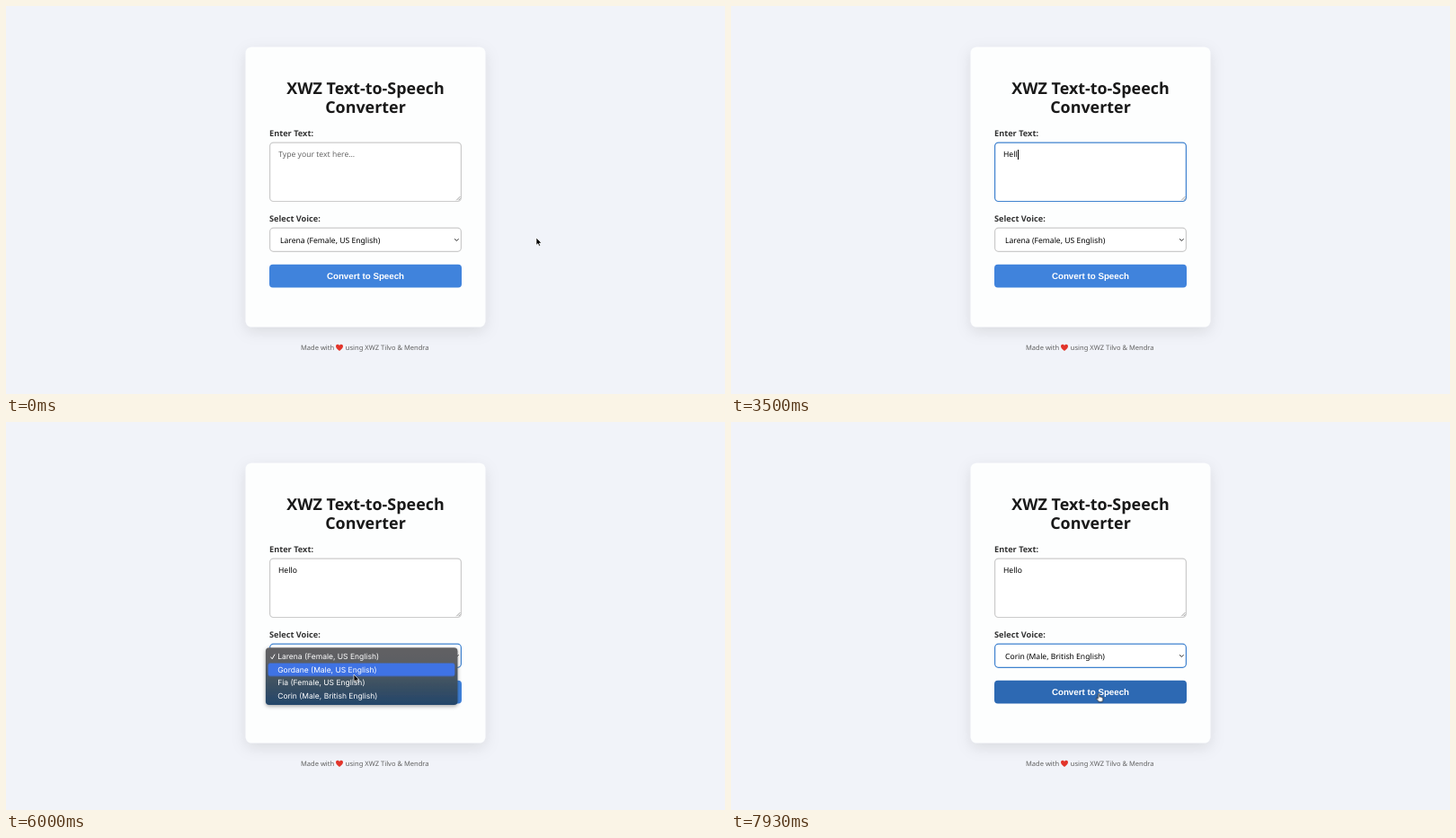
An HTML page for the animation above (8 s loop, 800 px wide and 432 px high).

```html
<!DOCTYPE html>
<html lang="en">
<head>
<meta charset="utf-8">
<title>Text-to-Speech Converter</title>
<style>
  html, body { margin: 0; width: 100%; height: 100%; overflow: hidden; background: #f1f3f9; }
  svg { position: absolute; left: 0; top: 0; display: block; }
  text, .typed { font-family: "Noto Sans", "Open Sans", sans-serif; font-size: 8.6px; text-rendering: geometricPrecision; }
  .title { font-size: 17.9px; font-weight: 800; fill: #191919; text-anchor: middle; }
  .label { font-size: 9.2px; font-weight: 700; fill: #333; }
  .value { font-size: 8.6px; font-weight: 500; }
  .footer { font-size: 7.55px; fill: #606060; }
  .action { font: 700 9.75px "Liberation Sans", Arial, sans-serif; fill: #fff; text-anchor: middle; }
  .menu text { font: 8.5px Inter, Roboto, sans-serif; fill: #fff; }
  .field { fill: #fff; stroke: #cbcbcb; stroke-width: 1.2; }

  .anim, .typed { animation: 8s linear infinite; }
  .step, .typed { animation-timing-function: step-end; }

  /* Typed text: the right border is the caret */
  .typed {
    position: absolute; left: 303px; top: 159.6px; height: 11px; line-height: 11px;
    white-space: pre; overflow: hidden; color: #000; font-weight: 500;
    border-right: .8px solid transparent; animation-name: type, caret;
  }
  @keyframes type {
    0% { width: 0; }
    26.6% { width: .75em; }
    35% { width: 1.32em; }
    38.5% { width: 1.59em; }
    41% { width: 1.86em; }
    45%, 100% { width: 2.5em; }
  }
  @keyframes caret {
    0% { border-color: transparent; }
    12.6% { border-color: #000; }
    19% { border-color: transparent; }
    24.5% { border-color: #000; }
    32% { border-color: transparent; }
    35% { border-color: #000; }
    51%, 100% { border-color: transparent; }
  }

  .placeholder { animation-name: placeholder; fill: #686868; }
  @keyframes placeholder { 0% { opacity: 1; } 26.6%, 100% { opacity: 0; } }

  .area { animation-name: area-focus; }
  @keyframes area-focus {
    0%, 12.5% { stroke: #cbcbcb; }
    15%, 61% { stroke: #3f82cf; }
    63%, 100% { stroke: #cbcbcb; }
  }
  .select { animation-name: select-focus; }
  @keyframes select-focus { 0%, 61% { stroke: #cbcbcb; } 63%, 100% { stroke: #3f82cf; } }

  .voice-before { animation-name: voice-before; }
  .voice-after { animation-name: voice-after; }
  @keyframes voice-before { 0% { opacity: 1; } 90.6%, 100% { opacity: 0; } }
  @keyframes voice-after { 0% { opacity: 0; } 90.6%, 100% { opacity: 1; } }

  .button { fill: #4083dc; animation-name: button-hover; }
  @keyframes button-hover { 0%, 93.4% { fill: #4083dc; } 96.3%, 100% { fill: #2d69b3; } }

  .menu { animation-name: menu; }
  @keyframes menu {
    0%, 60.99% { opacity: 0; }
    61%, 90.6% { opacity: 1; }
    93%, 100% { opacity: 0; }
  }
  .highlight { animation-name: highlight; }
  @keyframes highlight {
    0% { transform: none; fill: #4a78e4; }
    65.3% { transform: translateY(14.5px); fill: #3f73e5; }
    76.1% { transform: translateY(29px); fill: #316be0; }
    81.8%, 100% { transform: translateY(43.5px); fill: #2863db; }
  }

  .pointer { animation-name: path; }
  @keyframes path {
    0%, 1.5% { transform: translate(590px, 258px); }
    4% { transform: translate(568px, 291px); }
    6% { transform: translate(520px, 284px); }
    8% { transform: translate(458px, 228px); }
    9.5% { transform: translate(415px, 183px); }
    10.9%, 54.6% { transform: translate(399.5px, 169.5px); }
    56% { transform: translate(398px, 200px); }
    58.5%, 62% { transform: translate(395.5px, 255.5px); }
    65.5% { transform: translate(388px, 270px); }
    67.1% { transform: translate(387px, 277px); }
    75% { transform: translate(387px, 281px); }
    79% { transform: translate(387px, 290px); }
    83% { transform: translate(387px, 300px); }
    85.1%, 93% { transform: translate(387px, 303px); }
    95.2% { transform: translate(391px, 304px); }
    98%, 100% { transform: translate(409.5px, 303.8px); }
  }
  .arrow { animation-name: arrow; }
  .beam { animation-name: beam; }
  .hand { animation-name: hand; }
  @keyframes arrow { 0% { opacity: 1; } 8.4% { opacity: 0; } 56.7% { opacity: 1; } 93%, 100% { opacity: 0; } }
  @keyframes beam { 0% { opacity: 0; } 8.4% { opacity: 1; } 26.6% { opacity: 0; } 54.6% { opacity: 1; } 56.7%, 100% { opacity: 0; } }
  @keyframes hand { 0% { opacity: 0; } 93%, 100% { opacity: 1; } }
</style>
</head>
<body>
<svg width="800" height="432" viewBox="0 0 800 432">
  <defs>
    <filter id="card-shadow" x="-20%" y="-20%" width="140%" height="140%">
      <feDropShadow dx="0" dy="5" stdDeviation="8" flood-color="#000" flood-opacity=".1"/>
    </filter>
    <filter id="menu-shadow" x="-10%" y="-30%" width="120%" height="160%">
      <feDropShadow dx="0" dy="1.5" stdDeviation="2.2" flood-color="#000" flood-opacity=".35"/>
    </filter>
    <linearGradient id="menu-fill" x2="0" y2="1">
      <stop stop-color="#626164"/>
      <stop offset=".25" stop-color="#5c5e63"/>
      <stop offset=".65" stop-color="#3b5062"/>
      <stop offset="1" stop-color="#24466a"/>
    </linearGradient>
  </defs>

  <rect width="800" height="432" fill="#f1f3f9"/>
  <rect x="266.7" y="45.7" width="266.6" height="311.6" rx="6.5" fill="#fdfefe" filter="url(#card-shadow)"/>

  <text class="title" x="400" y="97.8">XWZ Text-to-Speech</text>
  <text class="title" x="400" y="119.4">Converter</text>

  <text class="label" x="293" y="145.2">Enter Text:</text>
  <rect class="field area anim" x="293.6" y="152.1" width="212.8" height="65.4" rx="4"/>
  <path d="M501.2 216.3l4.2-4.2M503.5 216.3l2-2" stroke="#777" stroke-width=".7"/>
  <text class="placeholder anim step" x="303.2" y="168.1">Type your text here...</text>

  <text class="label" x="293" y="240.2">Select Voice:</text>
  <rect class="field select anim" x="293.6" y="247.2" width="212.8" height="26.1" rx="4"/>
  <text class="value voice-before anim step" x="305" y="263.8">Larena (Female, US English)</text>
  <text class="value voice-after anim step" x="305" y="263.8">Corin (Male, British English)</text>
  <path d="M499.2 259.2l2.2 2.3 2.2-2.3" fill="none" stroke="#222" stroke-width=".95"/>

  <rect class="button anim" x="293" y="287.8" width="214" height="25.6" rx="4"/>
  <text class="action" x="400" y="304">Convert to Speech</text>

  <text class="footer" x="328" y="382.9">Made with</text>
  <path d="M371 384C368.2 381.8 367 380.4 367 378.7C367 376.3 370 376 371 378C372 376 375 376.3 375 378.7C375 380.4 373.8 381.8 371 384Z" fill="#e2352b"/>
  <text class="footer" x="377.8" y="382.9">using XWZ Tilvo &amp; Mendra</text>

  <g class="menu anim">
    <rect x="288.9" y="251.2" width="213.6" height="63.8" rx="4" fill="url(#menu-fill)" filter="url(#menu-shadow)"/>
    <rect class="highlight anim step" x="291.6" y="254" width="207.8" height="14.5" rx="2.5"/>
    <path d="M294.5 261.6l1.7 2.2 2.9-5.2" fill="none" stroke="#fff" stroke-width="1"/>
    <text x="302.2" y="264.1">Larena (Female, US English)</text>
    <text x="302.2" y="278.6">Gordane (Male, US English)</text>
    <text x="302.2" y="293.1">Fia (Female, US English)</text>
    <text x="302.2" y="307.6">Corin (Male, British English)</text>
  </g>

  <g class="pointer anim">
    <path class="arrow anim step" d="M0 0V8.3L1.9 6.6L3.1 9.3L4.6 8.7L3.4 6H6Z" stroke="#fff" stroke-width=".7" stroke-linejoin="round"/>
    <path class="beam anim step" d="M-1.7-4.5Q0-4.5 0-3.5Q0-4.5 1.7-4.5M0-3.5V3.5M-1.7 4.5Q0 4.5 0 3.5Q0 4.5 1.7 4.5" fill="none" stroke="#222" stroke-width=".8"/>
    <path class="hand anim step" d="M-1-.8Q-.1-2 .7-.8V2.2Q1.5 1.6 2 2.4Q2.8 2 3.3 2.8Q4.4 2.5 4.4 3.7V5.2Q4.2 6.3 3.6 7.8H-.3Q-1.1 6.3-2.8 4.4Q-3.1 3.1-1.9 3.4L-1 4.2Z" fill="#fff" stroke="#111" stroke-width=".75" stroke-linejoin="round"/>
  </g>
</svg>
<div class="typed">Hello</div>
</body>
</html>
```
